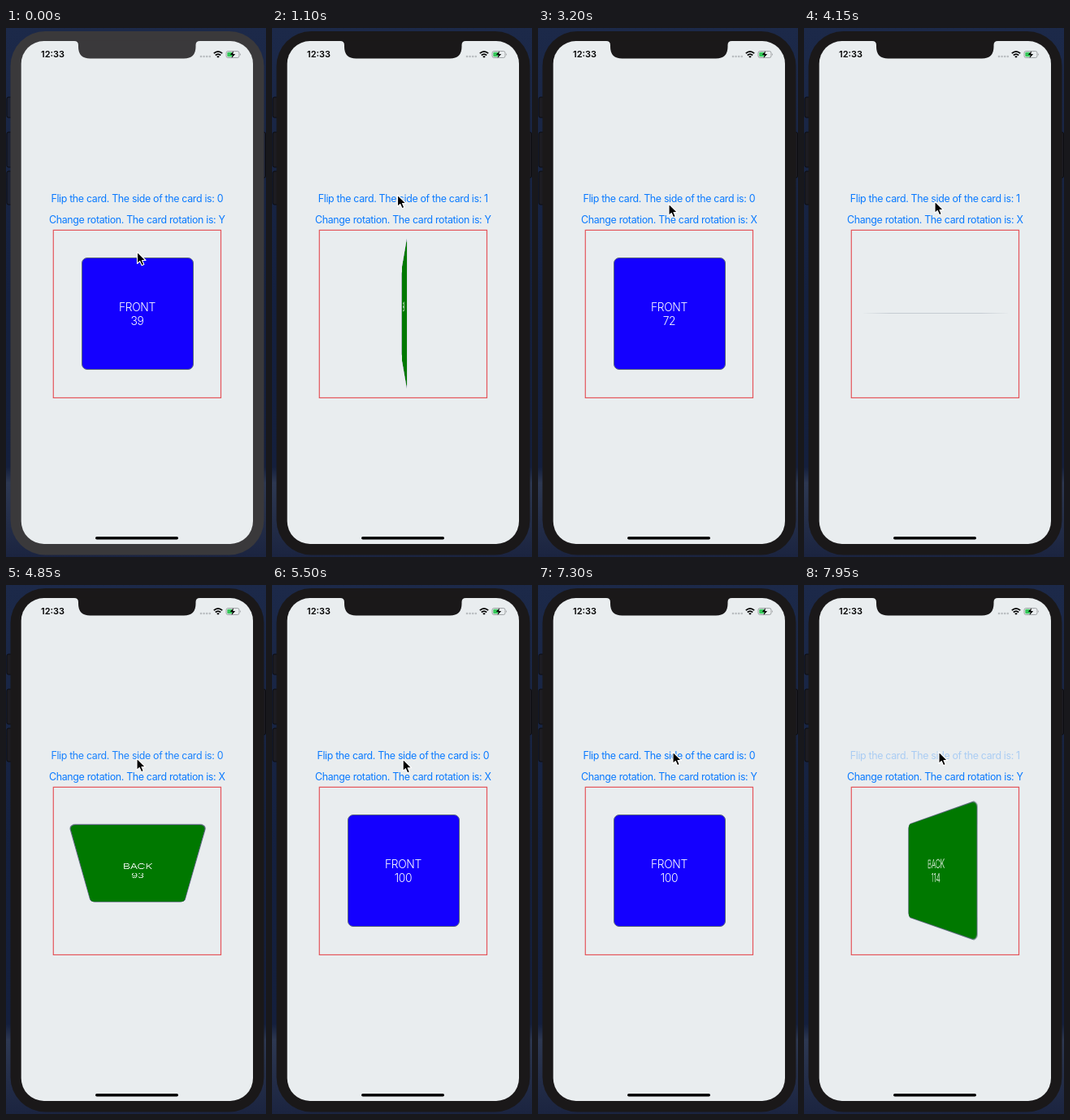
Write an HTML page that moves like this. It is 320 px wide and 650 px high and loops after 8 s.

```html
<!DOCTYPE html>
<html lang="en">
<head>
<meta charset="utf-8">
<title>Card flip</title>
<style>
  html, body { margin: 0; width: 100%; height: 100%; overflow: hidden; background: #17223f; }
  #stage { position: relative; width: 320px; height: 650px; overflow: hidden; }
  svg { position: absolute; left: 0; top: 0; display: block; }
  text, .card { font-family: Inter, "Liberation Sans", sans-serif; }
  .link { font-size: 12.4px; letter-spacing: -.33px; fill: #0a7aff; text-anchor: middle; }
  .scene { position: absolute; left: 92.5px; top: 282.4px; width: 138px; height: 138px; perspective: 268px; }
  .card {
    box-sizing: border-box; width: 100%; height: 100%; padding-top: 51.5px;
    border: 1px solid #59677a; border-radius: 7px;
    color: #fff; font-size: 13.8px; font-weight: 350; line-height: 17px;
    letter-spacing: -.35px; text-align: center; white-space: pre;
  }
</style>
</head>
<body>
<div id="stage">
  <svg width="320" height="650" viewBox="0 0 320 650">
    <defs>
      <linearGradient id="desk" x1="0" y1="0" x2="0" y2="1">
        <stop offset="0" stop-color="#1c2949"/>
        <stop offset=".5" stop-color="#14203f"/>
        <stop offset=".83" stop-color="#141f3d"/>
        <stop offset=".86" stop-color="#2d3852"/>
        <stop offset="1" stop-color="#1b2440"/>
      </linearGradient>
    </defs>
    <rect width="320" height="650" fill="url(#desk)"/>
    <g id="buttons" stroke="#0c0c10">
      <rect x="1" y="85" width="7" height="25" rx="2"/>
      <rect x="1" y="128" width="7" height="43" rx="2"/>
      <rect x="1" y="176" width="7" height="41" rx="2"/>
      <rect x="313" y="128" width="6.5" height="56" rx="2"/>
    </g>
    <rect id="bezel" x="5.5" y="4" width="312" height="643.5" rx="43"/>
    <rect x="18.7" y="16" width="285.3" height="618" rx="28" fill="#e9edef"/>
    <path id="notch" d="M84 15.5V16q5 0 5 5v2q0 14.500 14.500 14.500h115.500q14.500 0 14.500-14.500v-2q0-5 5-5v-.5z"/>

    <text x="43" y="36.300" font-size="11" font-weight="600">12:33</text>
    <g fill="#b9bdc0">
      <circle cx="240" cy="35" r="1.300"/><circle cx="243.600" cy="35" r="1.300"/>
      <circle cx="247.200" cy="35" r="1.300"/><circle cx="250.800" cy="35" r="1.300"/>
    </g>
    <g fill="none" stroke="#000" stroke-width="1.700">
      <path d="M255.800 31.200q5.200-4.600 10.400 0"/>
      <path d="M257.800 33.500q3.200-2.700 6.400 0"/>
    </g>
    <path d="M259.200 34.900q1.800-1.300 3.600 0L261 36.800z"/>
    <rect x="271" y="28.500" width="16" height="8" rx="2.200" fill="none" stroke="#8d9193" stroke-width=".8"/>
    <rect x="272.300" y="29.700" width="6" height="5.600" rx="1" fill="#35c759"/>
    <path d="M288 31q1.600 1.500 0 3z" fill="#8d9193"/>
    <path d="M280 28.200l-4.200 4.900h2.800l-1 3.900 4.600-5.100h-2.900z"/>

    <text class="link" id="flip" x="161.300" y="213.600"></text>
    <text class="link" id="axis" x="161.300" y="239.600"></text>
    <rect x="58.300" y="248.400" width="206.200" height="206" fill="none" stroke="#e4565b" stroke-width="1.200"/>
    <rect x="110" y="625" width="102" height="3.500" rx="1.750"/>
  </svg>
  <div class="scene"><div class="card" id="card"></div></div>
  <svg width="320" height="650" viewBox="0 0 320 650">
    <path id="cursor" d="M0 0V14.500L3.300 11.500 5.600 16.800 8.300 15.600 6 10.500H10.500Z"
      stroke="#fff" stroke-width="1.100" stroke-linejoin="round"/>
  </svg>
</div>
<script>
const LOOP = 8000, STEP = 50, FLIP_MS = 700, ACTIVE_AT = 500;
const flips = [744, 1492, 3800, 4608, 7508];
const turns = [2850, 5900];
const flipPresses = [...flips, 8020];

// [time, value...]
const counts = [[0, 39], [744, 39], [1444, 51], [1492, 51], [1950, 61], [2192, 72],
  [3800, 72], [4500, 86], [4608, 86], [4850, 93], [5308, 100], [7508, 100], [7950, 114], [8000, 116]];
const pointer = [[0, 161.5, 275], [100, 161.5, 275], [550, 154.5, 205], [2350, 154.5, 205],
  [2700, 160, 231], [2950, 160, 231], [3200, 161, 216], [3500, 161, 213], [5450, 161, 213],
  [5750, 163, 231], [6050, 163, 231], [6400, 166, 205], [8000, 166, 205]];

const el = id => document.getElementById(id);
const clamp = x => Math.min(1, Math.max(0, x));
const smooth = x => (1 - Math.cos(Math.PI * clamp(x))) / 2;
const passed = (list, t) => list.filter(at => at <= t).length;

function sample(track, t, ease = x => x) {
  const i = Math.max(1, track.findIndex(k => k[0] >= t));
  const [a, b] = [track[i - 1], track[i]];
  const p = ease(clamp((t - a[0]) / (b[0] - a[0])));
  return a.slice(1).map((v, j) => v + (b[j + 1] - v) * p);
}

// Links dim while held and recover after release.
function linkOpacity(releases, t) {
  return Math.min(...releases.map(at =>
    t < at ? 1 - .8 * clamp((t - at + 160) / 100) : .2 + .8 * smooth((t - at) / 300)));
}

function cardAngle(t) {
  return flips.reduce((angle, at, i) =>
    angle + (i % 2 ? -180 : 180) * smooth((t - at) / FLIP_MS), 0);
}

function render(t) {
  const axis = passed(turns, t) % 2 ? 'X' : 'Y';
  const angle = cardAngle(t), front = angle < 90;
  const count = Math.round(sample(counts, t)[0]);
  const card = el('card');
  card.textContent = `${front ? 'FRONT' : 'BACK'}\n${count}`;
  card.style.background = front ? '#1400ff' : '#007800';
  card.style.transform = `rotate${axis}(${front ? angle : angle - 180}deg)`;

  el('flip').textContent = `Flip the card. The side of the card is: ${passed(flips, t) % 2}`;
  el('flip').style.opacity = linkOpacity(flipPresses, t);
  el('axis').textContent = `Change rotation. The card rotation is: ${axis}`;
  el('axis').style.opacity = linkOpacity(turns, t);

  const shell = t < ACTIVE_AT ? '#3a393b' : '#1a1819';
  el('bezel').setAttribute('fill', shell);
  el('notch').setAttribute('fill', shell);
  el('buttons').setAttribute('fill', t < ACTIVE_AT ? '#1b2134' : '#1d1c22');
  el('cursor').setAttribute('transform', `translate(${sample(pointer, t, smooth)})`);
}

const start = performance.now();
function tick() {
  const t = (performance.now() - start) % LOOP;
  render(Math.floor(t / STEP) * STEP);
  requestAnimationFrame(tick);
}
tick();
</script>
</body>
</html>
```
